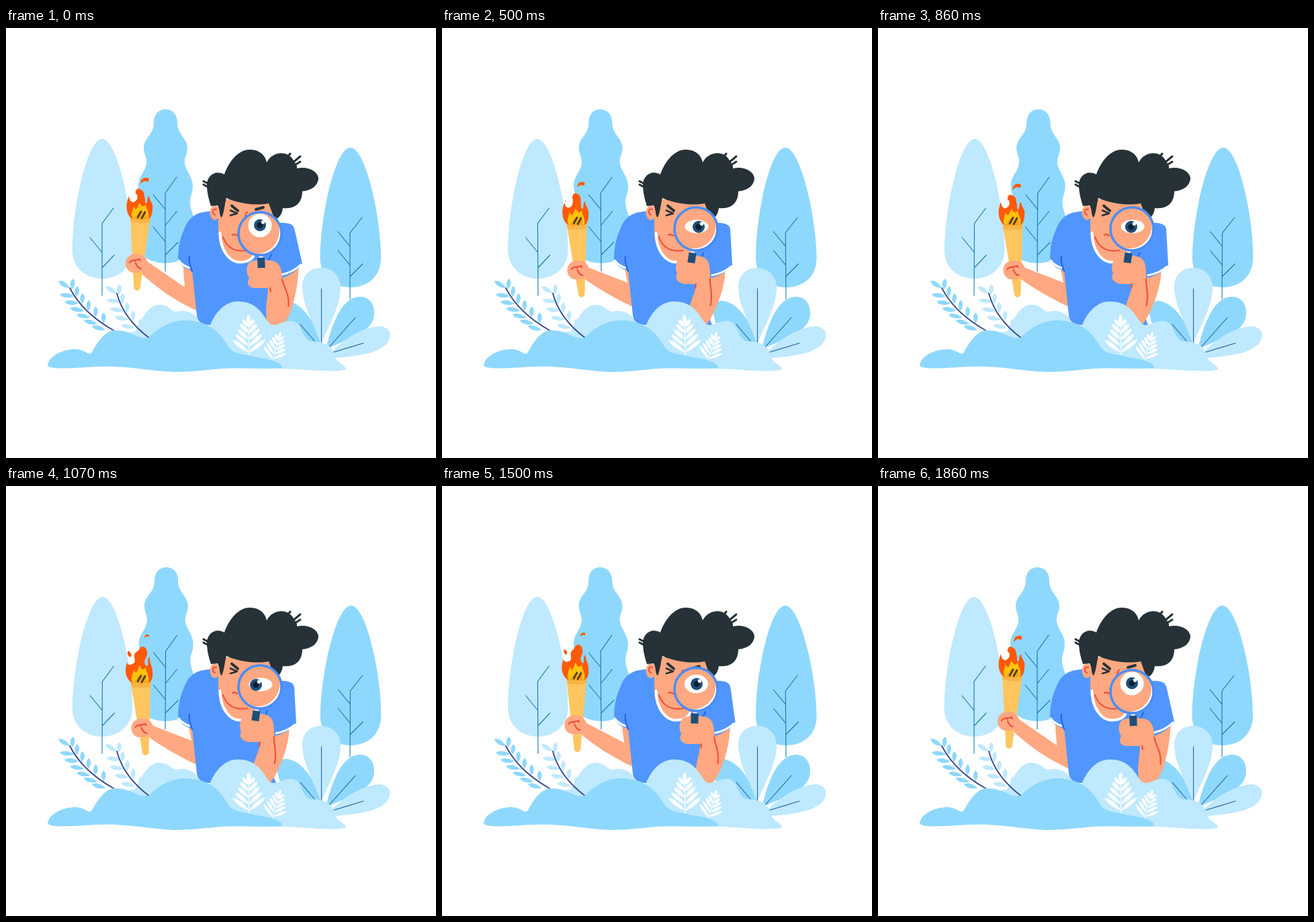
An HTML page that plays this animation: 640x640 px, repeating every 1930 ms.

```html
<!DOCTYPE html>
<html lang="en">
<head>
<meta charset="utf-8">
<title>Searching the woods</title>
<style>
  html, body { margin: 0; width: 100%; height: 100%; overflow: hidden; background: #fff; }
  svg { display: block; width: 100vw; height: 100vh; }
  .pale { fill: #bfe9ff; }
  .sky { fill: #8fd8fd; }
  .skin { fill: #ffa881; }
  .shirt { fill: #5196ff; }
  .hair { fill: #263238; }
  .line { fill: none; stroke-linecap: round; stroke-linejoin: round; }
  .twig { fill: none; stroke: #1577ad; stroke-width: 1.1; stroke-linecap: round; }
  .red { stroke: #f2503b; stroke-width: 2.2; }
  .white { stroke: #fff; stroke-width: 3; }
  .crease { stroke: #2468ea; stroke-width: 2.2; }
  .ink { stroke: #263238; stroke-width: 3; }
  .stem { stroke: #3a4a8c; stroke-width: 1.9; }
</style>
</head>
<body>
<svg viewBox="0 0 640 640">
  <defs>
    <clipPath id="glass"><circle r="32"/></clipPath>
  </defs>

  <g id="treeLeft">
    <path class="pale" d="M143 165C165 165 188 268 188 330C188 356 168 373 143 373C118 373 98.500 356 98.500 330C98.500 268 121 165 143 165Z"/>
    <path class="twig" d="M143 398V291L160 268M143 334L125 312M143 357L161 338"/>
  </g>
  <g id="treeMid">
    <path class="sky" d="M237 121C248 121 255 129 255 140C255 160 270 163 270 179C270 188 265 192 266 201C268 215 278 220 278 236C278 246 273 252 274 262C276 278 284 286 284 305C284 334 264 350 237 350C210 350 192 334 192 308C192 282 202 276 202 260C202 250 197 246 197 235C197 220 208 214 209 201C210 192 205 188 205 178C206 162 220 160 220 140C220 129 227 121 237 121Z"/>
    <path class="twig" d="M237 362V246L254 222M237 270L219 248M237 294L254 273M237 318L219 296M237 338L256 319"/>
  </g>
  <g id="treeRight">
    <path class="sky" d="M512.500 178C535 178 558 280 558 342C558 370 538 386 512.500 386C487 386 467.500 370 467.500 342C467.500 280 490 178 512.500 178Z"/>
    <path class="twig" d="M512 403V305L530 282M512 325L494 303M512 353L494 331M512 370L531 351"/>
  </g>

  <path class="sky" d="M470 474C463 440 440 407 416 406C404 407 400 420 408 440L440 474Z"/>
  <path class="pale" d="M469 470C458 440 441 412 441 385C441 367 454 357 469 357C485 357 498 368 498 387C498 412 482 440 469 470Z"/>
  <path class="sky" d="M476 478C484 445 498 400 527 400C540 400 548 410 548 424C548 454 510 462 476 478Z"/>
  <path class="pale" d="M478 490C500 462 535 444 557 444C568 445 573 452 571 461C566 482 530 489 478 492Z"/>
  <path class="twig" style="stroke:#235f9c" d="M469.500 388V470M480 476L520 431M486 483L532 469M438 441L460 467"/>

  <path class="pale" d="M180 470C196 452 205 412 228 412C245 412 246 424 255 422C270 418 286 426 292 445V470Z"/>
  <g id="sprigs"></g>

  <path id="armLeft" class="skin"/>
  <path class="shirt" d="M302 273C285 274 272 280 265 300C258 315 256 330 256 347C262 355 268 359 277 361L284 428C286 440 296 442 305 442L404 446L396 428L410 366L428 296C420 290 412 290 405 290L320 273Z"/>
  <path class="line white" d="M257 346Q263 354 273 357"/>
  <path class="line crease" d="M273 340C271 349 276 357 277 362"/>

  <g id="torch">
    <path fill="#ffc55f" d="M-15 -69H15L4.500 38Q0 44 -4.500 38Z"/>
    <path fill="#f8b54a" d="M-15 -69H15L14.300 -61Q0 -58 -14.300 -62Z"/>
  </g>
  <g id="hand">
    <path class="skin" d="M-17 2C-18 -8 -10 -14 -2 -14C8 -15 16 -8 16 2C14 10 6 15 -2 14C-10 15 -16 10 -17 2Z"/>
    <path class="line red" d="M-11 -1C-8 -6 -3 -3 4 -6M-3 -3C0 -6 4 -6 5 -4M-2 0C0 5 2 8 6 8"/>
  </g>
  <g id="flame">
    <path id="fire" fill="#ff5a0a"/>
    <path id="ember" fill="#ff5a0a" d="M-5 4C-6 -3 0 -7 6 -4C7 -2 6 0 5 1C1 -1 -2 0 -5 4Z"/>
    <path id="spark" fill="#ff5a0a" d="M-3 -6C4 -3 5 3 1 6C-4 3 -5 -1 -3 -6Z"/>
    <path id="core" fill="#ffc30c" d="M-12 2C-15 -5 -11 -8 -10 -16C-8 -10 -6 -11 -5 -13C-3 -16 -3 -19 -1 -21C2 -14 6 -14 8 -19C8 -11 14 -8 12 2Q0 6 -12 2Z"/>
    <path fill="#f8a51c" d="M-8 3C-9 -3 -4 -3 -3 -8C1 -4 6 -8 8 -11C7 -5 11 -2 9 3Q0 5 -8 3Z"/>
    <path class="line" stroke="#4d3d12" stroke-width="2.600" d="M-4 1L1 -8M2 2L7 -7"/>
  </g>

  <path class="skin" d="M316 255V300C316 330 328 349 350 347C364 346 372 336 384 325L405 255Z"/>
  <ellipse class="skin" cx="311" cy="275" rx="7.500" ry="11"/>
  <path class="line red" d="M313 270C307 268 306 276 311 278"/>
  <path class="line red" d="M323 311C328 327 341 334 359 331M337 308Q340 306 344 309M356 282Q356 276 359 274"/>
  <path class="line white" style="stroke-width:4" d="M318.500 305C319 330 332 350 350 348.500C360 348 366 345 369 338"/>
  <path class="hair" d="M305 265C301 253 299 243 299 233C299 220 312 210 325 218C331 200 345 181 363 181C378 181 386 190 388 200C396 184 420 180 429 199Q434 205 433 209C449 205 465 214 465 224C464 236 453 242 441 243C441 258 433 270 412 268C411 276 407 284 400 284C396 276 394 268 391 261C372 265 345 261 328 253C325 264 325 274 321 282C317 280 319 270 315 264Z"/>
  <path class="line ink" d="M417 195L423 187M425 202L438 191M425 207L438 199M294 228L303 233M294 233L303 238"/>
  <path class="line ink" style="stroke-width:4" d="M336 264.500L345 272"/>
  <path class="line ink" style="stroke-width:2.600" d="M334 271.500L344 276L334 279"/>
  <path id="brow" class="line ink" style="stroke-width:4" d="M372 270L383 267"/>

  <path id="armRight" class="skin"/>
  <path id="sleeve" class="shirt"/>
  <path id="cuff" class="line white"/>
  <path id="fold" class="line crease"/>
  <path id="fist" class="skin"/>
  <path id="elbow" class="line red"/>

  <g id="lens">
    <path d="M-3 32H3V38H-3Z" fill="#dfeaf2"/>
    <path d="M-5.500 36H5.500V51H-5.500Z" fill="#1f4e79"/>
    <circle r="32.500" fill="#fff"/>
    <circle class="skin" cx="-5" cy="-4" r="34" clip-path="url(#glass)"/>
    <circle r="32" fill="none" stroke="#4a8df8" stroke-width="3.600"/>
  </g>
  <ellipse id="eye" fill="#fff"/>
  <g id="pupil">
    <circle r="9" fill="#1f4e79"/>
    <circle r="4.500" fill="#10202f"/>
    <circle cx="4.500" cy="-4.500" r="2.700" fill="#fff"/>
  </g>

  <path class="pale" d="M296 470C303 430 322 407 345 407C372 407 380 423 390 437C398 449 408 436 424 436C442 437 437 457 452 466C470 466 486 470 490 490C492 498 506 502 506 508C490 514 450 508 410 507L165 505Z"/>
  <g id="ferns" fill="#fff" stroke="#fff"></g>
  <path class="sky" d="M62 502C64 488 84 478 104 478C119 479 121 487 127 484C136 468 147 450 163 450C187 450 195 464 212 461C227 446 246 435 268 435C305 437 318 453 331 474C339 487 355 484 372 490C395 493 412 498 411 506C390 508 340 505 320 507C290 510 270 512 250 512C200 509 180 502 140 504C110 505 66 510 62 502Z"/>
</svg>
<script>
const LOOP = 1930, FPS = 14;
const $ = id => document.getElementById(id);
const lerp = (a, b, p) => a + (b - a) * p;
const ease = p => (1 - Math.cos(Math.PI * p)) / 2;

// Blends two path strings that share one command structure.
function blend(a, b, p) {
  const nums = b.match(/-?[\d.]+/g);
  let i = 0;
  return a.replace(/-?[\d.]+/g, n => lerp(+n, +nums[i++], p).toFixed(2));
}

// Eased value at time t from [time, value] keys.
function track(keys, t) {
  const i = keys.findIndex(k => k[0] > t);
  if (i < 0) return keys[keys.length - 1][1];
  if (!i) return keys[0][1];
  const [t0, v0] = keys[i - 1], [t1, v1] = keys[i];
  return lerp(v0, v1, ease((t - t0) / (t1 - t0)));
}

const leaf = (x, y, angle, len, half) =>
  `<path transform="translate(${x} ${y}) rotate(${angle})" d="M0 0C${len * .35} ${-half} ${len * .75} ${-half * 1.2} ${len} 0C${len * .75} ${half * 1.2} ${len * .35} ${half} 0 0Z"/>`;

function sprig(cls, [x0, y0, x1, y1, x2, y2], count) {
  let out = leaf(x0, y0, 212, 20, 4);
  for (let i = 0; i < count; i++) {
    const u = .03 + i * .93 / count, v = 1 - u;
    const x = v * v * x0 + 2 * u * v * x1 + u * u * x2;
    const y = v * v * y0 + 2 * u * v * y1 + u * u * y2;
    out += leaf(x + 2, y, -84 - i, 16, 4);
    out += leaf(x + 5, y + 10, 186 + i * 2, 21, 4);
  }
  return `<g class="${cls}">${out}</g><path class="line stem" d="M${x0} ${y0}Q${x1} ${y1} ${x2} ${y2}"/>`;
}

function fern(x, y, tilt, scale) {
  let out = `<path fill="none" stroke-width="1.2" d="M0 0V-58"/><g stroke="none">` + leaf(0, -50, -90, 15, 3.4);
  for (let i = 0; i < 5; i++) {
    const h = -8 - i * 9.6, len = 31 - i * 4.2;
    out += leaf(0, h, -38 - i * 3, len, 3.6) + leaf(0, h, 218 + i * 3, len, 3.6);
  }
  return `<g transform="translate(${x} ${y}) rotate(${tilt}) scale(${scale})">${out}</g></g>`;
}

$('sprigs').innerHTML = sprig('sky', [95, 387, 114, 424, 160, 450], 6) + sprig('pale', [165, 395, 175, 433, 214, 462], 5);
$('ferns').innerHTML = fern(362, 491, -1, 1) + fern(395, 498, 17, .74);

// Each shape has an open pose and a drawn-in pose.
const POSES = {
  armLeft: [
    'M264 352C264 370 266 378 266 386L208 346L198 362C225 388 255 408 287 422L290 362Z',
    'M271 352C273 366 275 372 276 379L214 355L210 372C235 390 262 405 287 416L290 362Z'],
  armRight: [
    'M436 354L434 376C431 400 424 430 412 442C404 447 392 445 388 434C385 415 390 402 390 386L411 364Z',
    'M422 354L421 370C418 395 406 425 394 441C386 442 371 432 367 422C369 405 378 395 378 380L401 362Z'],
  fist: [
    'M392 387L370 387C358 386 359 378 362 372C357 366 357 352 364 348C374 344 398 344 404 350C410 356 411 364 411 375L408 394Z',
    'M381 381L360 381C348 378 347 371 350 365C346 358 348 345 356 341C366 337 386 338 392 343C398 348 399 356 399 370L398 390Z'],
  sleeve: [
    'M405 290C422 290 428 291 430 302L441 351C434 360 424 368 411 372L392 345Z',
    'M405 290C420 290 428 291 429 300L432 353C425 362 414 369 400 372L385 345Z'],
  cuff: ['M411 367Q428 363 439 352', 'M402 368Q419 365 430 355'],
  fold: ['M389 346Q393 343 395 337', 'M384 344Q387 341 389 335'],
  elbow: [
    'M411 374C414 388 422 395 420.500 414M393 387L394 392',
    'M399 373C398 386 404 394 399.500 413M378 381L377 387']
};
const FIRE = [
  'M-14 2C-22 -6 -22 -20 -17 -31C-16 -24 -14 -21 -9 -22C-5 -25 -3 -28 -5 -33C-9 -35 -7 -40 -4 -42C4 -41 6 -36 6 -30C8 -26 6 -22 8 -20C12 -20 8 -27 13 -31C13 -24 20 -20 18 -12C18 -5 16 0 14 2Q0 6 -14 2Z',
  'M-14 2C-22 -5 -24 -14 -20 -27C-17 -22 -14 -24 -10 -26C-5 -30 -13 -38 -6 -43C-1 -44 -2 -51 4 -51C10 -50 12 -40 8 -34C4 -28 8 -22 10 -22C14 -25 8 -30 14 -36C13 -27 18 -22 18 -14C19 -6 17 0 14 2Q0 6 -14 2Z'
];

const LEFT = [[0, 0], [430, 1], [1290, 1], [1720, 0]];
const RIGHT = [[0, 0], [360, 1], [1270, 1], [1720, 0]];
const GAZE = [[0, 378], [500, 382], [640, 382], [1070, 372], [1180, 372], [1500, 379], [1860, 378]];
const SWAY = [[0, 0], [430, -2], [960, 1.7], [1430, -2], [LOOP, 0]];
const FLICKER = [[0, 0], [210, 1], [430, 0], [640, 1], [860, 0], [1070, 1], [1290, 0], [1500, .85], [1860, 0], [LOOP, 0]];
const RISE = [[0, 0], [360, 1]];

const place = (id, x, y, rest = '') => $(id).setAttribute('transform', `translate(${x} ${y}) ${rest}`);

function sway(id, base, height, shift) {
  place(id, 0, base, `skewX(${-Math.atan(shift / height) * 180 / Math.PI}) translate(0 ${-base})`);
}

function draw(t) {
  const left = track(LEFT, t), right = track(RIGHT, t), wind = track(SWAY, t), w = track(FLICKER, t);

  sway('treeLeft', 398, 233, wind * .7);
  sway('treeMid', 362, 241, wind);
  sway('treeRight', 403, 225, wind * .9);

  for (const id in POSES) $(id).setAttribute('d', blend(...POSES[id], id === 'armLeft' ? left : right));

  const hx = lerp(195, 203.5, left), hy = lerp(350, 360, left);
  place('hand', hx, hy);
  place('torch', hx + 1.7, hy, `rotate(${lerp(2.6, -4, left)})`);
  place('flame', 200, lerp(281, 290, left));
  $('fire').setAttribute('d', blend(...FIRE, w));
  place('core', 0, 0, `scale(1 ${lerp(1, 1.1, w)})`);
  const lift = track(RISE, t % 430);
  place('ember', lerp(6, 11, lift), lerp(-53, -66, w), `scale(${lerp(1.05, .6, w)})`);
  place('spark', -16, lerp(-30, -40, w), `scale(${w * .8})`);

  place('brow', 0, lerp(0, 3, right));
  place('lens', 378, lerp(306, 299, right), `rotate(${lerp(-2.5, 8, right)})`);
  const eye = $('eye');
  eye.setAttribute('cx', lerp(378, 379, right));
  eye.setAttribute('cy', lerp(294, 295.5, right));
  eye.setAttribute('rx', 17.5);
  eye.setAttribute('ry', lerp(17.5, 10, right));
  place('pupil', track(GAZE, t), lerp(293.5, 296, right));
}

// The whole scene advances in even steps of 1/14 s, rounded to 10 ms.
const startOf = k => Math.round(k * 100 / FPS) * 10;
let last = -1;
function tick() {
  const t = performance.now() % LOOP;
  let k = Math.floor(t * FPS / 1000) + 1;
  while (startOf(k) > t) k--;
  if (k !== last) draw(startOf(last = k));
  requestAnimationFrame(tick);
}
tick();
</script>
</body>
</html>
```
